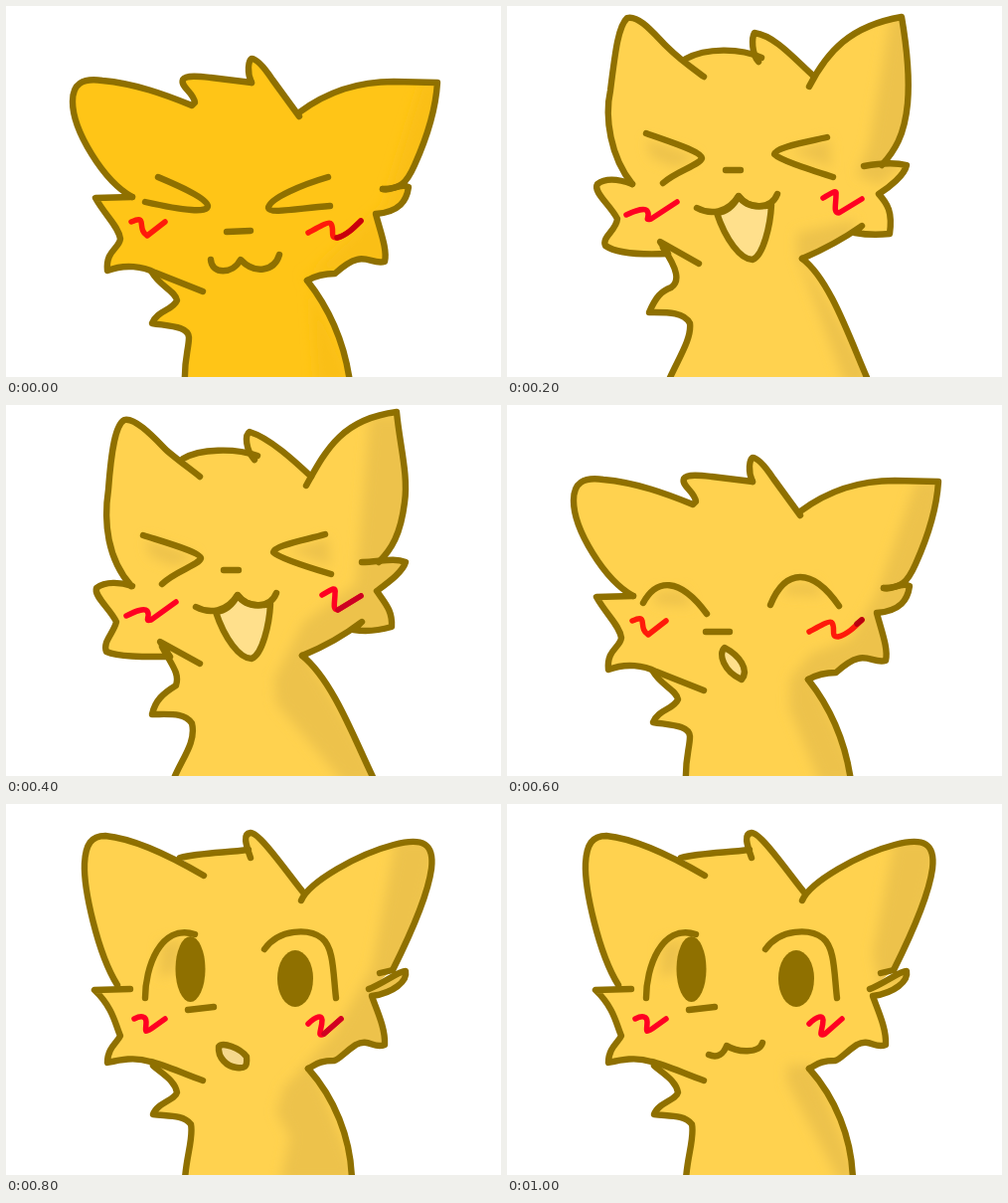
Write an HTML page that moves like this. It is 498 by 373 pixels and loops after 1.2 s.

```html
<!DOCTYPE html>
<html>
<head>
<meta charset="utf-8">
<style>
html, body { margin: 0; height: 100%; overflow: hidden; background: #fff; }
svg { display: block; width: 100vw; height: 100vh; fill: none; stroke-linecap: round; stroke-linejoin: round; }
.line { stroke: #8f7000; stroke-width: 6.4; }
.red { stroke-width: 5.5; }
.pupil { fill: #8f7000; }
</style>
</head>
<body>
<svg id="stage" viewBox="0 0 498 373" xmlns="http://www.w3.org/2000/svg">
<filter id="soft" x="-20%" y="-20%" width="140%" height="140%"><feGaussianBlur stdDeviation="6"/></filter>
</svg>
<script>
// Outline strokes run clockwise from the bottom left, so joined together they also give the fill.
const low = {
  outline: [
    'M180 378C179 355 184 345 184 333C183 322 165 322 147 319C152 306 168 306 172 296C170 286 155 282 147 268',
    'M198 287L150 268C138 262 120 259 102 266C100 246 114 244 115 234C113 221 100 211 90 193L127 192',
    'M127 192C98 176 67 125 67 96C67 78 77 72 97 75C130 78 160 89 187 100L190 97C189 87 175 81 178 74C181 69 197 71 206 72L247 77',
    'M247 77C242 66 244 55 247 53C253 53 262 65 268 74L295 111',
    'M295 107C325 85 355 76 390 76L434 77C432 110 420 140 411 160C403 178 397 184 379 184',
    'M379 184C388 187 396 177 405 182C403 196 396 207 372 209C376 225 384 245 381 257C365 261 360 242 331 269C320 269 310 272 303 276',
    'M303 276C322 300 340 335 346 378'
  ],
  blush: ['M126 217C133 214 135 214 136 217C137 222 136 227 142 231L160 217',
    'M304 228C315 222 325 216 327 219C331 225 325 233 333 233C342 231 350 223 357 216'],
  red: '#ff1a0a'
};
const high = {
  outline: [
    'M162 378C172 355 186 335 184 319C178 307 160 308 143 308C150 292 155 287 165 283C174 277 172 265 157 243',
    'M193 259L154 237L162 249C140 250 112 250 99 241C95 232 110 226 111 214C104 200 86 187 91 179C100 172 115 175 126 179',
    'M126 179C104 152 98 112 104 85C109 45 112 20 121 12C133 9 148 28 161 41C174 54 187 63 198 71',
    'M180 53C200 42 235 42 256 52',
    'M253 56C246 48 246 32 249 27C270 30 290 54 308 70',
    'M304 81C322 46 345 20 397 11C402 40 405 75 403 98C400 130 390 146 377 160',
    'M359 161C375 158 390 157 402 160C400 170 385 182 374 189C383 199 388 207 385 229Q367 231 350 228L357 221Q330 240 297 254',
    'M297 254C325 275 345 335 364 378'
  ],
  blush: ['M120 210C130 205 139 203 141 206C145 212 137 216 145 214L171 197',
    'M318 193C328 187 332 184 331 190C331 200 328 208 334 208L357 194'],
  red: '#ff0022'
};
const higher = {
  outline: [
    'M168 378C175 358 192 340 187 320C180 309 165 311 147 311C150 297 158 290 171 282C175 270 167 262 157 243',
    'M195 260L155 238L165 253C145 253 115 254 101 248C97 238 108 230 111 218C105 205 88 192 91 184C100 177 115 178 127 182',
    'M126 182C102 155 98 118 103 85C106 45 110 20 119 15C130 12 150 34 162 46C175 57 185 64 195 72',
    'M178 54C195 44 230 43 253 51',
    'M250 55C241 45 240 30 245 27C265 33 290 56 307 72',
    'M302 81C322 45 338 14 393 7C396 40 405 70 401 98C397 130 388 145 375 158',
    'M358 158C375 158 390 153 402 158C399 168 385 178 373 187C382 200 389 207 388 223Q367 229 350 226L358 218Q332 238 298 252',
    'M298 252C330 278 352 340 371 378'
  ],
  blush: ['M121 212C131 207 139 204 142 207C146 213 138 218 146 216L171 198',
    'M318 191C328 185 332 182 331 189C331 199 328 206 334 206L357 192'],
  red: '#ff0022'
};
const calm = {
  outline: [
    'M180 378C181 355 189 335 186 322C178 312 162 314 148 312C152 300 170 298 172 290C170 278 158 272 148 263',
    'M198 278C180 272 160 262 145 259C130 254 115 257 102 260C102 245 112 240 115 233C110 222 108 205 89 187L125 186',
    'M112 182C92 150 78 85 79 60C80 40 86 32 100 32C130 35 170 55 199 72',
    'M175 54C195 49 220 49 244 46',
    'M246 54C241 40 238 30 246 29C255 28 285 72 300 90',
    'M297 97C305 78 355 50 390 41C420 33 431 40 428 65C424 95 400 145 389 167',
    'M365 186C380 180 395 168 402 168C404 178 390 190 368 193C372 205 382 225 381 242C370 247 365 235 352 242C340 250 335 257 330 258C315 258 312 262 304 266',
    'M304 266C330 295 347 335 348 378'
  ],
  blush: ['M129 216C137 212 141 214 141 219C141 228 138 231 146 226L160 216',
    'M304 221C312 213 318 212 318 217C318 227 312 235 320 231L337 216'],
  red: '#ff0022'
};

const path = (d, attrs) => `<path d="${d}" ${attrs}/>`;
const line = d => path(d, 'class="line"');
const mouth = (d, fill) => path(d, `class="line" style="fill:${fill}"`);
const red = (d, color) => path(d, `class="red" stroke="${color}"`);
const pupil = (x, y, rx, ry) => `<ellipse class="pupil" cx="${x}" cy="${y}" rx="${rx}" ry="${ry}"/>`;

const laugh = mouth('M211 208C220 235 235 255 247 255C258 251 265 220 266 200C252 203 240 202 233 191C228 201 220 207 211 208', '#ffe08c')
  + line('M191 203C204 210 222 209 233 191C242 203 265 207 272 189');
const open = line('M140 195C140 165 155 120 190 131M260 146C275 125 305 125 318 135C330 145 329 170 332 195M183 207L209 204M376 170L389 167')
  + pupil(185.5, 166, 15, 33) + pupil(291, 175.5, 18, 28.5);
const lidShade = 'M155 140L180 135L172 168L155 175Z';
const squintShade = 'M140 134L192 152L170 162L145 152Z M285 146L324 134L326 162Z';

const scenes = [
  { pose: low, fill: '#ffc517', dark: '#fabf15',
    shade: 'M418 75L440 75L420 200L390 260L300 270L350 380L312 380L305 270L380 200Z',
    face: line('M153 172C172 180 202 193 203 201C203 208 180 206 140 197M324 172C300 179 265 193 264 203C265 209 290 204 326 201M222 227L246 226M206 255C207 270 228 270 236 255C250 270 270 267 275 250'),
    extra: red('M333 233C342 231 350 223 357 216', '#c8000c') },
  { pose: high, shade: 'M386 10L410 10L410 150L375 180L352 170L364 140Z M292 228L350 215L350 240L300 258L370 380L340 380L292 250Z' + squintShade,
    face: line('M140 128C165 137 195 146 196 153C194 160 170 166 157 178M322 132C300 137 270 142 269 149C275 155 300 163 328 172M220 165L235 165') + laugh },
  { pose: higher, shade: 'M366 10L410 10L410 235L305 255L380 380L340 380L272 300L270 275L300 218L352 180Z' + squintShade,
    face: line('M138 131C163 139 195 148 196 154C194 161 170 167 157 180M321 130C300 136 270 141 269 148C275 154 300 162 327 170M219 166L234 166') + laugh,
    extra: red('M334 206L357 192', '#cc0022') },
  { pose: low, shade: 'M412 75L440 75L420 190L390 262L310 276L355 380L315 380L284 305L285 275L306 250L345 235L372 190Z M148 188L178 186L186 202L150 200Z M280 180L310 178L318 192L278 190Z',
    face: line('M137 199C150 175 173 172 201 210M265 201C280 164 307 163 334 202M200 228L224 228')
      + mouth('M219 244C212 250 218 268 236 276C244 266 234 252 219 244Z', '#ffe08c'),
    extra: red('M352 220L357 216', '#b80010') },
  { pose: calm, shade: 'M392 35L435 35L405 180L390 250L310 265L355 380L276 380L286 335L272 310L280 285L330 230L368 165Z' + lidShade,
    face: open + mouth('M214 244C218 239 235 245 242 254C243 265 240 266 232 265C222 264 213 255 214 244Z', '#f5d88c'),
    extra: red('M320 231L337 216', '#d00022') },
  { pose: calm, shade: 'M390 35L435 35L405 180L375 185L368 150Z M282 262L308 262L355 380L335 380L282 280Z' + lidShade,
    face: open + line('M203 252C212 256 218 251 221 243C232 250 254 251 257 240') }
];

const stage = document.getElementById('stage');
stage.innerHTML += scenes.map(({ pose, fill = '#ffd24f', dark = '#edc24c', shade, face, extra = '' }, i) => {
  const body = 'M' + pose.outline.map(d => d.slice(1)).join('L') + 'Z';
  return `<g class="scene"><clipPath id="body${i}">${path(body, '')}</clipPath>`
    + path(body, `fill="${fill}"`)
    + `<g clip-path="url(#body${i})">${path(shade, `fill="${dark}" filter="url(#soft)"`)}</g>`
    + pose.outline.map(line).join('') + face
    + pose.blush.map(d => red(d, pose.red)).join('') + extra + '</g>';
}).join('');

const groups = [...stage.querySelectorAll('.scene')];
function draw(now) {
  const current = Math.floor(now / 200) % groups.length;
  groups.forEach((g, i) => g.style.display = i === current ? '' : 'none');
  requestAnimationFrame(draw);
}
draw(0);
</script>
</body>
</html>
```
